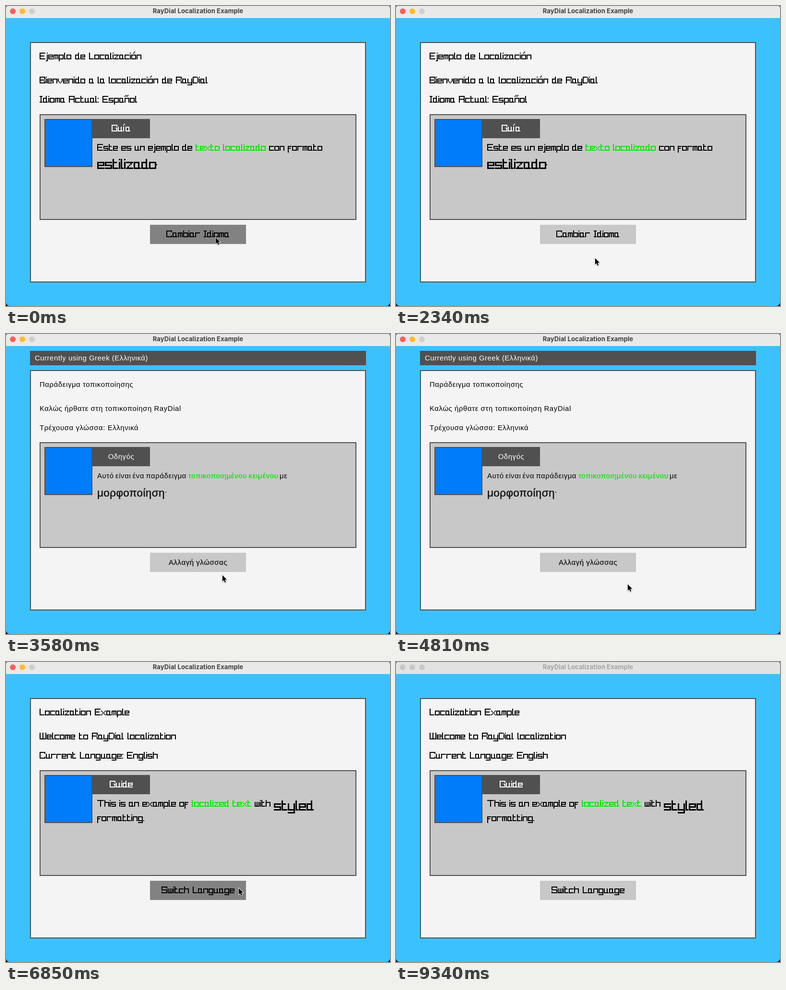
Write an HTML page with a canvas that moves like this. It is 800x624 px and loops after 9.43 s.

```html
<!DOCTYPE html>
<html lang="en">
<head>
<meta charset="utf-8">
<title>Localization example</title>
<style>
html, body { margin: 0; width: 800px; height: 624px; overflow: hidden; background: #111; }
canvas { display: block; border-radius: 4px 4px 8px 8px; }
</style>
</head>
<body>
<canvas id="stage" width="800" height="624"></canvas>
<script>
const ctx = document.getElementById('stage').getContext('2d');
const LOOP = 9430, STEPS = 106;
const DARK = '#505050', LIGHT = '#c8c8c8', PAPER = '#f4f4f4', GREEN = '#00e600';

// Pixel lettering: strokes of "column row" points on a ten-row grid
const strokes = {
  A: '07015157 0454', B: '535101075755 0444', C: '525101075756', D: '41010747 5256',
  E: '51010757 0444', G: '52510107575444', I: '0121 1117 0727', L: '010747',
  R: '07015153 0444 5557', S: '5251010454570706', T: '0161 3137', W: '01076761 3137',
  a: '4707033337', b: '0107474303', c: '43030747', d: '47070333 3137', e: '470703434505',
  f: '330309 0525', g: '43030747 434909', h: '0107 034347', i: '01 0307', j: '11 131909',
  l: '010717', m: '07034347 2327', n: '07034347', o: '0307474303', p: '0903434707',
  r: '070343', s: '430305454707', t: '010737 0323', u: '030747 3337', v: '0305274543',
  w: '03074743 2327', x: '0347 4307', y: '030747 434909', z: '03430747',
  'í': '0307 0110', 'ó': '0307474303 2130', 'ñ': '07034347 01102130', ':': '03 07', '.': '07'
};

function makeGlyph(code) {
  const cells = new Set();
  for (const stroke of code.split(' ')) {
    const pts = stroke.match(/../g).map(p => [+p[0], +p[1]]);
    pts.forEach(([x, y], i) => {
      const [px, py] = pts[Math.max(0, i - 1)];
      const n = Math.max(Math.abs(x - px), Math.abs(y - py));
      for (let k = 0; k <= n; k++) {
        const u = n ? k / n : 0;
        cells.add(Math.round(px + (x - px) * u) + ',' + Math.round(py + (y - py) * u));
      }
    });
  }
  const list = [...cells].map(c => c.split(',').map(Number));
  return { cells: list, width: 1 + Math.max(...list.map(c => c[0])) };
}
const glyphs = { ' ': { cells: [], width: 3 } };
for (const ch in strokes) glyphs[ch] = makeGlyph(strokes[ch]);

const pixelWidth = (text, size) =>
  [...text].reduce((w, ch) => w + glyphs[ch].width * size + 1, -1);

function pixelText(text, x, y, color = '#000', size = 2) {
  ctx.fillStyle = color;
  for (const ch of text) {
    for (const [cx, cy] of glyphs[ch].cells) ctx.fillRect(x + cx * size, y + cy * size, size, size);
    x += glyphs[ch].width * size + 1;
  }
  return x - 1;
}

// Words separated by a slightly tighter gap than plain lines
function pixelWords(text, x, y, color) {
  for (const word of text.split(' ')) x = pixelText(word, x, y, color) + 7;
  return x;
}

const pixelCentered = (text, cx, y, color) =>
  pixelText(text, Math.floor(cx - pixelWidth(text, 2) / 2), y, color);

function sans(text, x, y, { color = '#000', size = 14.9, gap = 0.6, word = 0, align = 'left', weight = 0 } = {}) {
  ctx.font = size + 'px "Liberation Sans", Arial, sans-serif';
  ctx.letterSpacing = gap + 'px';
  ctx.wordSpacing = word + 'px';
  ctx.textAlign = align;
  ctx.fillStyle = ctx.strokeStyle = color;
  ctx.fillText(text, x, y);
  if (weight) {
    ctx.lineWidth = weight;
    ctx.strokeText(text, x, y);
  }
}

function box(x, y, w, h, fill, border) {
  ctx.fillStyle = border || fill;
  ctx.fillRect(x, y, w, h);
  if (!border) return;
  ctx.fillStyle = fill;
  ctx.fillRect(x + 2, y + 2, w - 4, h - 4);
}

function pixelPage(title, welcome, current, guide, button) {
  [title, welcome, current].forEach((line, i) => pixelText(line, 70, [95, 145, 185][i]));
  pixelCentered(guide, 240, 245, '#fff');
  pixelCentered(button, 400, 465);
}

function spanish() {
  pixelPage('Ejemplo de Localización', 'Bienvenido a la localización de RayDial',
    'Idioma Actual: Español', 'Guía', 'Cambiar Idioma');
  let x = pixelWords('Este es un ejemplo de', 190, 285);
  x = pixelWords('texto localizado', x, 285, GREEN);
  pixelWords('con formato', x, 285);
  pixelText('.', pixelText('estilizado', 190, 315, '#000', 3), 315);
}

function english() {
  pixelPage('Localization Example', 'Welcome to RayDial localization',
    'Current Language: English', 'Guide', 'Switch Language');
  let x = pixelWords('This is an example of', 190, 285);
  x = pixelWords('localized text', x, 285, GREEN);
  x = pixelWords('with', x, 285);
  pixelText('styled', x, 285, '#000', 3);
  pixelText('formatting.', 190, 315);
}

function greek() {
  box(50, 35, 700, 30, DARK);
  sans('Currently using Greek (Ελληνικά)', 60, 55, { color: '#fff', gap: 0.54 });
  sans('Παράδειγμα τοπικοποίησης', 70, 110);
  sans('Καλώς ήρθατε στη τοπικοποίηση RayDial', 70, 160);
  sans('Τρέχουσα γλώσσα: Ελληνικά', 70, 200);
  sans('Οδηγός', 240, 260, { color: '#fff', align: 'center' });
  sans('Αυτό είναι ένα παράδειγμα', 190, 300, { word: -1.4 });
  sans('τοπικοποιημένου κειμένου', 380, 300, { color: GREEN, gap: 0.7, word: -1.4, weight: 0.25 });
  sans('με', 570, 300);
  sans('μορφοποίηση', 190, 338, { size: 22.4, gap: 0.44, color: '#111', weight: 0.5 });
  box(332, 328, 2, 2, '#222');
  sans('Αλλαγή γλώσσας', 400, 480, { align: 'center', color: '#111', weight: 0.25 });
}

// Pointer path: [step, x, y]
const path = [
  [5, 436, 481], [14, 379, 528], [16, 379, 528], [17, 377, 530], [22, 400, 539],
  [27, 417, 520], [31, 436, 481], [33, 439, 476], [38, 440, 475], [40, 450, 501],
  [44, 473, 518], [50, 473, 518], [54, 482, 520], [58, 482, 520], [60, 483, 514],
  [63, 483, 514], [68, 487, 494], [74, 481, 475], [75, 484, 470], [82, 484, 470],
  [85, 502, 476], [93, 695, 576], [95, 723, 601]
];

function pointerAt(step) {
  const i = path.findIndex(p => p[0] >= step);
  if (i < 1) return path[i ? path.length - 1 : 0].slice(1);
  const [s0, x0, y0] = path[i - 1], [s1, x1, y1] = path[i];
  const u = (step - s0) / (s1 - s0);
  return [Math.round(x0 + (x1 - x0) * u), Math.round(y0 + (y1 - y0) * u)];
}

const arrow = new Path2D('M0 0V13.2L3 10.4 5.1 15.2 7.3 14.3 5.3 9.6H9.4Z');
function pointer(x, y) {
  ctx.save();
  ctx.translate(x + 0.8, y + 0.5);
  ctx.shadowColor = 'rgba(0,0,0,.3)';
  ctx.shadowBlur = 2;
  ctx.shadowOffsetY = 1;
  ctx.strokeStyle = '#fff';
  ctx.lineWidth = 1.8;
  ctx.stroke(arrow);
  ctx.shadowColor = 'transparent';
  ctx.fillStyle = '#000';
  ctx.fill(arrow);
  ctx.restore();
}

function titleBar(active) {
  box(0, 0, 800, 25, active ? '#e9e9e9' : '#e2e2e2');
  ['#ff5f57', '#febc2e', '#cfcfcf'].forEach((color, i) => {
    ctx.beginPath();
    ctx.arc(14 + 20 * i, 11, 6, 0, 7);
    ctx.fillStyle = active ? color : '#c9c9c9';
    ctx.fill();
  });
  ctx.font = 'bold 13px Inter, sans-serif';
  ctx.letterSpacing = '0.12px';
  ctx.wordSpacing = '0px';
  ctx.textAlign = 'center';
  ctx.fillStyle = active ? '#3e3e3e' : '#a5a5a5';
  ctx.fillText('RayDial Localization Example', 400, 15);
}

function draw(now) {
  const step = Math.floor((now % LOOP + 14) / (LOOP / STEPS)) % STEPS;
  const active = step < 105;
  const [x, y] = pointerAt(step);
  const hover = active && x >= 300 && x < 500 && y >= 455 && y < 494;

  box(0, 0, 800, 624, '#3cc1ff');
  titleBar(active);
  box(50, 75, 700, 500, PAPER, DARK);
  box(70, 225, 660, 220, LIGHT, DARK);
  box(180, 235, 120, 40, DARK);
  box(80, 235, 100, 100, '#007cfa', DARK);
  box(300, 455, 200, 40, hover ? '#828282' : LIGHT);
  (step < 34 ? spanish : step < 77 ? greek : english)();
  if (active) pointer(x, y);
  requestAnimationFrame(draw);
}
requestAnimationFrame(draw);
</script>
</body>
</html>
```
